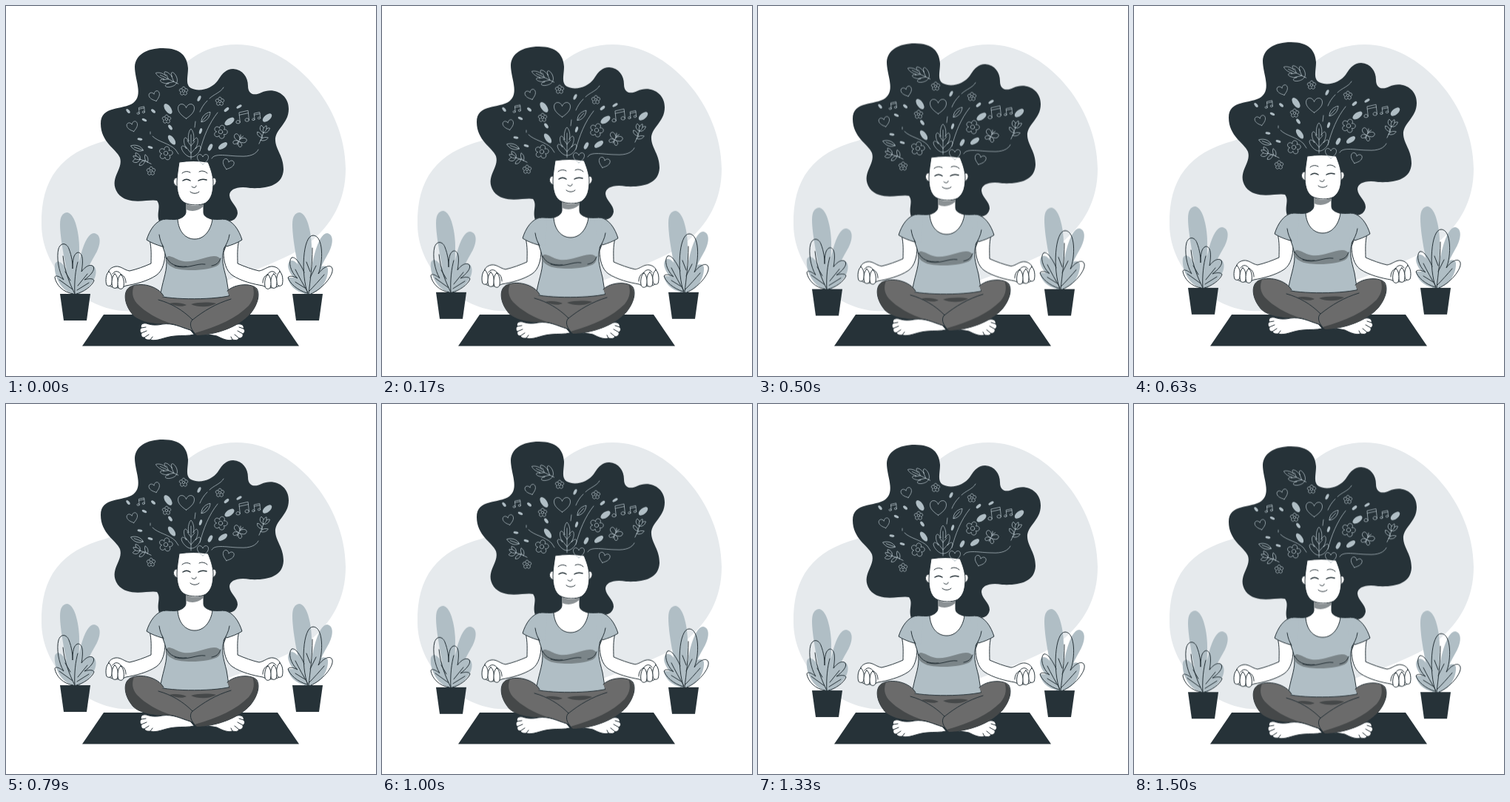
These frames come from a looping animation (500 px wide and 500 px high, 1540 ms). An HTML page:

```html
<!DOCTYPE html>
<html lang="en">
<head>
<meta charset="utf-8">
<title>Meditation</title>
<style>
  html, body { margin: 0; width: 100%; height: 100%; overflow: hidden; background: #fff; }
  svg { display: block; width: 100vw; height: 100vh; }
  .float { animation: float 1540ms linear -30ms infinite; }
  @keyframes float {
    0%, 100% { transform: translateY(.4px); }
    50% { transform: translateY(-9.6px); }
  }
  .dark { fill: #263238; }
  .blue { fill: #b0bec5; }
  .skin { fill: #fff; }
  .pants { fill: #6b6b6b; }
  .shade { fill: #454849; }
  .line { stroke: #263238; stroke-width: 1; stroke-linecap: round; stroke-linejoin: round; }
  .none { fill: none; }
  .doodle { fill: none; stroke: #b0bec5; stroke-width: .75; stroke-linecap: round; stroke-linejoin: round; }
  .thin * { vector-effect: non-scaling-stroke; }
  .seeds { fill: #b0bec5; }
</style>
</head>
<body>
<svg viewBox="0 0 500 500">
  <defs>
    <g id="heart" class="thin"><path d="M0 4.6C-3 2.600-5 .6-5-1.800C-5-5-1-5.200 0-2C1-5.200 5-5 5-1.800C5 .6 3 2.600 0 4.600Z"/></g>
    <g id="flower" class="thin">
      <path d="M-1.9-2.6A2.1 2.1 0 1 1 1.9-2.6A2.1 2.1 0 1 1 3.04 1A2.1 2.1 0 1 1 0 3.2A2.1 2.1 0 1 1-3.04 1A2.1 2.1 0 1 1-1.9-2.6Z"/>
      <circle r="1.7"/>
    </g>
    <g id="note" class="thin"><path d="M-3.5 5.2L-4.5-4.5L4.5-6.5L5.5 3M-4.3-2L4.8-4M-3.5 5.2A2 1.6 0 1 1-4.6 3.6A2 1.6 0 0 1-3.5 5.2M5.5 3A2 1.6 0 1 1 4.4 1.5A2 1.6 0 0 1 5.5 3"/></g>
    <path id="leaf" d="M0 9C-5 4-4-4 0-9C4-4 5 4 0 9V-4"/>
    <g id="oak" class="thin"><path d="M0 20V-13M0 12L-7 3M0 12L7 4M0 2L-5-5M0 2L5-4
      M0 17C-5 18-13 9-13 4C-12 0-8 3-6 6C-11-2-10-10-7-9C-5-8-4-5-3-4C-5-12-2-20 0-21C3-18 5-11 3-4C5-8 8-11 9-7C10-3 8 2 6 6C9 2 13 0 13 5C12 11 5 18 0 17"/></g>
    <g id="tulip">
      <path d="M0-3C-6-4-7-9-5-12C-3-11-2-10-1-9C0-12 1-13 2-13L3-9C5-11 6-11 7-11C7-7 5-3 0-3ZM-1-9C-2-7-1-5 0-3C2-5 3-7 3-9M0-3C0 3-1 8-2 13"/>
      <path d="M0 4C-6 4-8 1-8-2C-4-2-1 0 0 4ZM-1 8C5 8 7 5 8 2C3 2 0 4-1 8"/>
    </g>
    <path id="fly" d="M0-4V6M0-4L-2-8M0-4L2-8M0-2C-3-8-9-8-9-4C-9 0-4 1 0 1C-6 1-8 5-5 7C-3 8-1 5 0 2C1 5 3 8 5 7C8 5 6 1 0 1C4 1 9 0 9-4C9-8 3-8 0-2"/>
    <path id="finger" class="skin" d="M0 0C-4 2-5 13-3 18C-1 20 3 20 4 16C5 11 4 2 0 0Z"/>
    <g id="arm" class="line">
      <path class="skin" d="M194 316C197 327 196 339 196 348C187 352 176 356 167 358C160 357 155 351 148 352C142 353 138 357 138 362L138 377C145 382 155 382 162 378C174 376 191 372 203 364C212 358 215 344 215 333L211 322Z"/>
      <use href="#finger" transform="translate(139 359)"/>
      <use href="#finger" transform="translate(147 362)"/>
      <use href="#finger" transform="translate(155 363)"/>
      <path class="none" d="M144 362C148 356 153 359 156 363C160 365 162 369 162 374"/>
    </g>
    <path id="sleeve" class="blue line" d="M214 288C202 290 194 303 190 316C196 320 204 323 211 325L217 310Z"/>
  </defs>

  <path fill="#e6eaed" d="M312 52C387 52 459 135 459 220C459 263 440 296 410 320C372 350 290 370 245 393C215 408 185 414 157 412C100 407 48 353 48 295C47 234 74 198 135 182C207 158 215 52 312 52Z"/>
  <path class="dark" d="M132 417H367L396 459.500H103Z"/>

  <g class="float">
    <g transform="translate(0 1)">
      <!-- left plant -->
      <path class="blue" d="M89 388C80 350 73 313 73 294C73 283 77 278 83 278C94 280 99 309 99 326C99 354 97 372 94 388Z"/>
      <path class="blue" d="M94 388C95 352 105 306 119 306C131 308 127 325 120 336C112 349 104 368 100 388Z"/>
      <path class="blue" d="M92 388C76 386 64 365 66 348C70 338 80 350 84 360L92 375C98 359 106 349 115 349C125 351 122 366 116 373C111 381 103 386 96 388Z"/>
      <g class="line none">
        <path d="M91 388C77 386 68 376 66 366C66 362 72 364 78 369C71 358 68 338 71 327C74 318 82 319 85 327C89 337 90 347 90 354C90 343 91 334 97 332C105 332 104 347 102 358C107 351 114 347 118 351C121 356 113 364 106 369C112 367 118 367 119 370C116 378 104 386 95 388"/>
        <path d="M77 337C79 357 86 374 93 388C92 372 94 355 97 345M80 358L87 370M97 377L110 361M72 369L90 382M96 383L112 373"/>
      </g>
      <path class="dark" d="M73 388H114L109 424H78Z"/>

      <!-- right plant -->
      <path class="blue" d="M403 388C394 350 387 315 387 294C387 283 391 278 397 278C408 280 413 309 413 326C413 354 411 372 408 388Z"/>
      <path class="blue" d="M410 388C410 352 421 306 434 306C445 308 441 325 434 336C426 349 419 368 414 388Z"/>
      <path class="blue" d="M406 388C391 386 382 375 381 366L389 366C378 354 380 342 387 343C394 344 400 356 405 370L415 361C423 350 432 347 435 354C436 368 426 386 410 388Z"/>
      <g class="line none">
        <path d="M408 388C398 362 401 309 415 309C429 309 429 345 422 361C429 351 439 347 441 354C443 363 427 382 412 388M407 387C393 383 383 373 381 366C383 363 389 364 394 367C384 358 381 344 386 339C392 337 399 350 403 359"/>
        <path d="M414 326C414 350 411 370 409 388M411 366L419 350M411 358L406 345M410 384C416 378 424 369 430 362M408 386C402 376 396 365 391 355M404 380L391 372"/>
      </g>
      <path class="dark" d="M387 388H428L423 424H392Z"/>
    </g>

    <!-- hair -->
    <path class="dark" d="M207 291C203 279 210 271 204 263C194 260 165 271 151 253C138 233 159 221 154 205C149 193 128 184 128 159C128 134 158 141 172 131C186 120 174 100 174 82C175 66 190 57 212 57C236 57 245 68 246 84C246 96 242 106 250 111C262 117 279 111 286 101C293 90 298 85 307 85C320 86 327 96 327 108C327 119 335 122 345 117C362 109 382 119 382 139C382 160 363 166 364 182C365 195 375 203 375 221C374 243 352 247 330 246C314 243 302 247 302 256C303 266 313 270 313 280C312 287 307 291 300 291Z"/>

    <!-- thoughts -->
    <g class="doodle">
      <use href="#oak" transform="translate(218 98) rotate(-64) scale(.82)"/>
      <use href="#oak" transform="translate(250 187)"/>
      <use href="#heart" transform="translate(201 122) rotate(-18) scale(1.450)"/>
      <use href="#heart" transform="translate(243.500 142) scale(2.200)"/>
      <use href="#heart" transform="translate(171 163) rotate(-15) scale(1.450)"/>
      <use href="#heart" transform="translate(300 214) rotate(18) scale(1.500)"/>
      <use href="#flower" transform="translate(240 115) scale(1.050)"/>
      <use href="#flower" transform="translate(289 129) scale(1.050)"/>
      <use href="#flower" transform="translate(217 153) scale(1.050)"/>
      <use href="#flower" transform="translate(290 170) rotate(20) scale(1.650)"/>
      <use href="#flower" transform="translate(216 199) rotate(12) scale(1.650)"/>
      <use href="#flower" transform="translate(196 223) scale(1.050)"/>
      <use href="#note" transform="translate(183 141) scale(.8)"/>
      <use href="#note" transform="translate(321 150) scale(1.350)"/>
      <use href="#note" transform="translate(339 149) scale(.85)"/>
      <use href="#leaf" transform="translate(270 150) rotate(42)"/>
      <use href="#leaf" transform="translate(177 192) rotate(-70)"/>
      <use href="#tulip" transform="translate(184 208) rotate(-75)"/>
      <use href="#tulip" transform="translate(347 174) rotate(14)"/>
      <use href="#fly" transform="translate(315 182) rotate(28)"/>
      <path d="M294 110C290 117 281 119 275 125M272 128C267 133 264 138 262 143M256 156L255 164M198 176C206 184 220 185 229 194L233 200M195 170V173M286 144C274 159 267 177 262 196M278 206C282 198 300 203 316 203C330 204 338 200 341 194"/>
    </g>
    <g class="seeds">
      <ellipse cx="219" cy="139" rx="4" ry="8" transform="rotate(-35 219 139)"/>
      <ellipse cx="224" cy="181" rx="3.500" ry="7.500" transform="rotate(-35 224 181)"/>
      <ellipse cx="302" cy="156" rx="4" ry="7.500" transform="rotate(55 302 156)"/>
      <ellipse cx="353" cy="151" rx="4" ry="7.500" transform="rotate(50 353 151)"/>
      <ellipse cx="293" cy="189" rx="3.500" ry="7" transform="rotate(55 293 189)"/>
      <ellipse cx="261" cy="125" rx="2" ry="4" transform="rotate(25 261 125)"/>
      <ellipse cx="276" cy="191" rx="2.500" ry="5" transform="rotate(28 276 191)"/>
      <ellipse cx="315" cy="136" rx="1.800" ry="4" transform="rotate(60 315 136)"/>
      <ellipse cx="298" cy="140" rx="2" ry="4" transform="rotate(50 298 140)"/>
      <ellipse cx="165" cy="142" rx="1.800" ry="3.500" transform="rotate(-40 165 142)"/>
      <ellipse cx="199" cy="142" rx="1.800" ry="3.500" transform="rotate(-50 199 142)"/>
      <ellipse cx="222" cy="164" rx="2" ry="4" transform="rotate(-35 222 164)"/>
      <ellipse cx="187" cy="154" rx="1.600" ry="3.500" transform="rotate(-65 187 154)"/>
      <ellipse cx="181" cy="180" rx="1.600" ry="3.500" transform="rotate(-80 181 180)"/>
      <ellipse cx="263" cy="169" rx="1.800" ry="4" transform="rotate(18 263 169)"/>
      <ellipse cx="195" cy="191" rx="1.600" ry="3.500" transform="rotate(-75 195 191)"/>
    </g>

    <!-- torso -->
    <path class="skin line" d="M243 262V279C242 285 236 287 229 289C230 305 240 316 256 316C272 315 280 301 281 289C274 287 267 285 267 279V260Z"/>
    <path fill="#8b9194" d="M243.500 267C251 271 260 271 266.500 267V271C259 278 250 278 243.500 275Z"/>
    <use href="#arm"/>
    <use href="#arm" transform="matrix(-1 0 0 1 509 0)"/>
    <path class="blue line" d="M214 288C221 288 227 289 232 288C233 304 242 315 255 315C268 315 277 303 279 288C285 289 291 288 296 288C303 300 301 314 295 327C290 342 294 353 298 369L302 394C286 400 224 400 208 394C211 373 217 361 217 347C217 335 210 323 208 313C206 302 210 293 214 288Z"/>
    <use href="#sleeve"/>
    <use href="#sleeve" transform="matrix(-1 0 0 1 509 0)"/>
    <path class="blue" d="M213 289H223L221 326L212 323C209 310 208 299 213 289ZM287 289H296L298 323L292 328Z"/>
    <path class="line none" d="M207 309C208 316 210 321 213 326M302 309C301 317 297 323 294 329"/>
    <path fill="#7b8589" d="M217 341C217 335 225 339 233 343C250 350 265 339 281 338C291 338 292 345 287 350C277 358 239 359 227 354C220 351 216 347 217 341Z"/>
    <path class="line none" d="M217 340C221 349 230 353 244 352M228 351C244 357 257 347 269 349M290 341C288 347 284 350 278 351"/>

    <!-- legs -->
    <g class="line">
      <path class="pants" d="M204 391C222 397.500 286 397.500 308 390L300 406L252 428L206 406Z"/>
      <path class="shade" stroke="none" d="M221 402C227 400 238 401 244 404C239 407 229 406 221 402ZM250 403C260 400 276 400 284 402C276 407 260 408 250 403Z"/>
      <path class="skin" d="M262 438C276 431 297 427 312 430C319 429 322 432 321 436C324 439 322 442 320 443C321 447 318 449 315 449C312 453 308 451 306 451C300 453 293 450 285 446C277 444 268 444 260 444Z"/>
      <path class="none" d="M321 436L315 434M320 443L313 439M315 449L309 444M306 451L304 447"/>
      <path class="pants" d="M213 392C206 378 180 372 167 380C158 386 160 402 169 414C178 429 207 430 226 430L258 441C271 438 282 432 291 427C277 421 268 424 252 424C239 411 224 402 206 397"/>
      <path class="shade" stroke="none" d="M167 380C158 386 160 402 169 414C178 429 207 430 226 430C206 424 187 413 177 402C170 394 170 385 173 378C171 378 169 379 167 380Z"/>
      <path class="skin" d="M249 438C236 434 226 428 211 430C203 432 195 431 190 429C184 428 181 431 183 435C180 437 181 441 183 442C182 446 184 448 187 448C189 452 193 451 195 451C204 454 214 447 228 446C238 445 247 446 254 444Z"/>
      <path class="none" d="M183 435L189 434M183 442L190 439M187 448L193 444M195 451L198 447"/>
      <path class="pants" d="M299 385C309 375 332 374 339 382C344 391 339 405 330 416C314 434 284 444 258 445C251 439 247 431 251 425C267 412 284 402 304 396"/>
      <path class="shade" stroke="none" d="M333 378C346 386 340 405 330 416C314 434 284 444 258 445L255 442C287 433 311 422 328 405C336 395 336 386 333 378Z"/>
    </g>

    <!-- head -->
    <g class="line">
      <path class="skin" d="M232 232C225 231 224 242 232 244M279 232C286 231 286 242 278 244"/>
      <path class="skin" d="M234 211Q253 208 273 211C276 218 280 229 280 238C280 251 278 260 270 266C263 270 248 270 240 265C233 260 231 250 231 238C231 229 233 219 234 211Z"/>
      <path class="none" d="M238 226C241 223 246 223 249 225M261 224C264 222 269 223 272 226M257 243C257 246 253 246 251 244M249 251C252 254 258 254 261 251"/>
      <path class="none" stroke-width="1.500" d="M239 236C242 234 246 234 249 236M260 236C263 234 268 234 271 235"/>
    </g>
    <use class="doodle" href="#heart" transform="translate(266 207) scale(1.500)"/>
  </g>
</svg>
</body>
</html>
```
